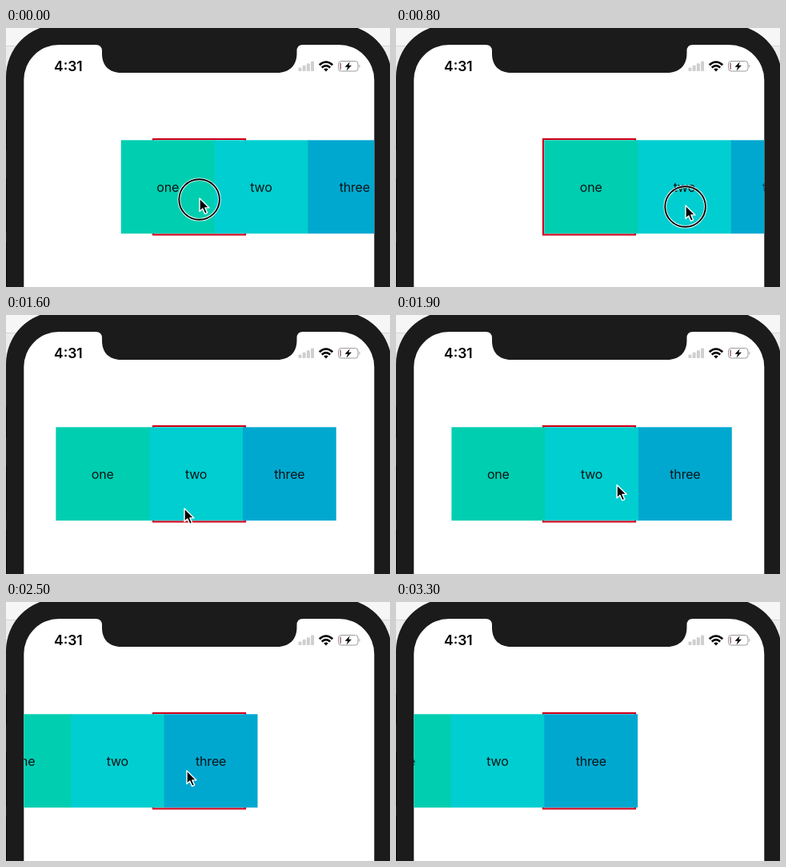
An HTML page that plays this animation: 480 px wide and 324 px high, repeating every 3400 ms.

```html
<!DOCTYPE html>
<html lang="en">
<head>
<meta charset="utf-8">
<title>Snapping strip</title>
<style>
  html, body { margin: 0; width: 100%; height: 100%; overflow: hidden; background: #fff; }
  svg { display: block; width: 480px; height: 324px; }
  text { font-family: Inter, "Open Sans", sans-serif; fill: #0b1416; }
  .clock { font-size: 17.5px; font-weight: 600; fill: #000; }
  .label { font-size: 16px; letter-spacing: -.2px; text-anchor: middle; }
</style>
</head>
<body>
<svg viewBox="0 0 480 324">
  <defs>
    <clipPath id="screen"><rect x="22.300" y="21" width="438" height="400" rx="44"/></clipPath>
  </defs>

  <!-- desktop and phone body -->
  <rect width="480" height="324" fill="#ececec"/>
  <rect width="480" height="22" fill="#f6f6f6"/>
  <path d="M0 22.5H480" stroke="#d4d4d4"/>
  <rect x="0" y="-4" width="482" height="440" rx="65" fill="#1b1b1b"/>
  <path d="M.5 115v38M.5 188v68M.5 268v60" stroke="#060606"/>
  <rect x="22.300" y="21" width="438" height="400" rx="44" fill="#fff"/>
  <path d="M112 20V21Q120 21 120 29V32C120 47 129 56 144 56H339C354 56 363.500 47 363.500 32V29Q363.500 21 371 21V20Z" fill="#1b1b1b"/>

  <!-- status bar -->
  <text class="clock" x="60" y="54">4:31</text>
  <g id="signal" fill="#cfcfcf"></g>
  <g fill="none" stroke="#000" stroke-width="2.600">
    <path d="M391.800 46.300Q400 38.700 408.200 46.300"/>
    <path d="M394.800 49.500Q400 44.800 405.200 49.500"/>
  </g>
  <path d="M397.200 51.600Q400 49.200 402.800 51.600L400 54.400Z"/>
  <rect x="415.500" y="41.500" width="24.500" height="12.500" rx="3.500" fill="#fff" stroke="#9c9c9c"/>
  <path d="M441.500 45.600Q443.500 47.700 441.500 49.900Z" fill="#9c9c9c"/>
  <rect x="417.300" y="43.500" width="1.700" height="8.500" rx=".8" fill="#a87c7e"/>
  <path d="M429.800 42.300L423.600 48.700H427.200L425.600 53.400L432 46.800H428.300Z"/>

  <g clip-path="url(#screen)">
    <rect x="184" y="139" width="115" height="119.500" fill="none" stroke="#d0021b" stroke-width="2.200"/>
    <g id="strip"></g>
  </g>

  <g id="pointer">
    <g id="ring" fill="none">
      <circle cx=".6" cy="2.500" r="25.300" stroke="#fff" stroke-width="3.600"/>
      <circle cx=".6" cy="2.500" r="25.300" stroke="#000" stroke-width="1.900"/>
    </g>
    <path d="M1 1V17.500L4.800 14L7.600 20.400L10.600 19.100L7.900 12.900H13Z" stroke="#fff" stroke-width="1.400" stroke-linejoin="round"/>
  </g>
</svg>
<script>
  const LOOP = 3400, TICK = 100, SIDE = 116.8, HOME = 185.3;
  const DRAG_POWER = 1.5, SPRING = 7; // equal decay rate and angular speed, per second
  const $ = id => document.getElementById(id);

  // Each drag pulls the strip from one snap slot, then lets it spring to another.
  const drags = [
    { down: -200, up: 100, reach: 109, from: 0, to: 0 },
    { down: 800, up: 1300, reach: 59, from: 0, to: 1 },
    { down: 2000, up: 2300, reach: 23, from: 1, to: 2 }
  ];

  // pointer stops: time, x, y
  const stops = [
    [0, 241, 212], [200, 205, 222], [800, 361, 221], [1200, 243, 235.5],
    [1600, 222, 241], [2000, 285, 206], [2200, 256, 206.5], [2500, 225, 210], [3100, 450, 340]
  ];

  const slot = i => HOME - i * SIDE;
  const dragAt = t => drags.filter(d => d.down <= t).pop();

  function stripX(t) {
    const { down, up, reach, from, to } = dragAt(t);
    const pull = reach - slot(from);
    if (t < up) return slot(from) + pull * ((t - down) / (up - down)) ** DRAG_POWER;
    const s = (t - up) / 1000;
    const speed = DRAG_POWER * pull / (up - down) * 1000;
    const offset = reach - slot(to);
    const swing = speed / SPRING + offset;
    const a = SPRING * s;
    return slot(to) + Math.exp(-a) * (offset * Math.cos(a) + swing * Math.sin(a));
  }

  function pointerAt(t) {
    const i = stops.findIndex(s => s[0] > t);
    const [t0, x0, y0] = stops[i - 1], [t1, x1, y1] = stops[i];
    const p = (t - t0) / (t1 - t0), e = p * p * (3 - 2 * p);
    return [x0 + (x1 - x0) * e, y0 + (y1 - y0) * e];
  }

  // Tiles overlap to the right so that no seam shows.
  const tiles = [["one", "#00ceb0"], ["two", "#00ced0"], ["three", "#00a8d0"]];
  $("strip").innerHTML = tiles.map(([name, color], i) =>
    `<rect x="${i * SIDE}" y="140.3" width="${SIDE + (i < 2 ? 1 : 0)}" height="116.9" fill="${color}"/>`).join("") +
    tiles.map(([name], i) => `<text class="label" x="${(i + .5) * SIDE}" y="205">${name}</text>`).join("");

  for (let i = 0; i < 4; i++) {
    const h = 4.5 + i * 2.65;
    $("signal").innerHTML += `<rect x="${365.5 + i * 5.2}" y="${54 - h}" width="4" height="${h}" rx="1"/>`;
  }

  const move = (id, x, y) => $(id).setAttribute("transform", `translate(${x} ${y})`);
  const show = (id, on) => $(id).setAttribute("visibility", on ? "visible" : "hidden");

  function draw(time) {
    const t = Math.floor(time % LOOP / TICK) * TICK;
    const present = t < 3100;
    move("strip", stripX(t), 0);
    if (present) move("pointer", ...pointerAt(t));
    show("pointer", present);
    show("ring", present && t < dragAt(t).up);
  }

  const start = performance.now();
  function loop() {
    draw(performance.now() - start);
    requestAnimationFrame(loop);
  }
  loop();
</script>
</body>
</html>
```
